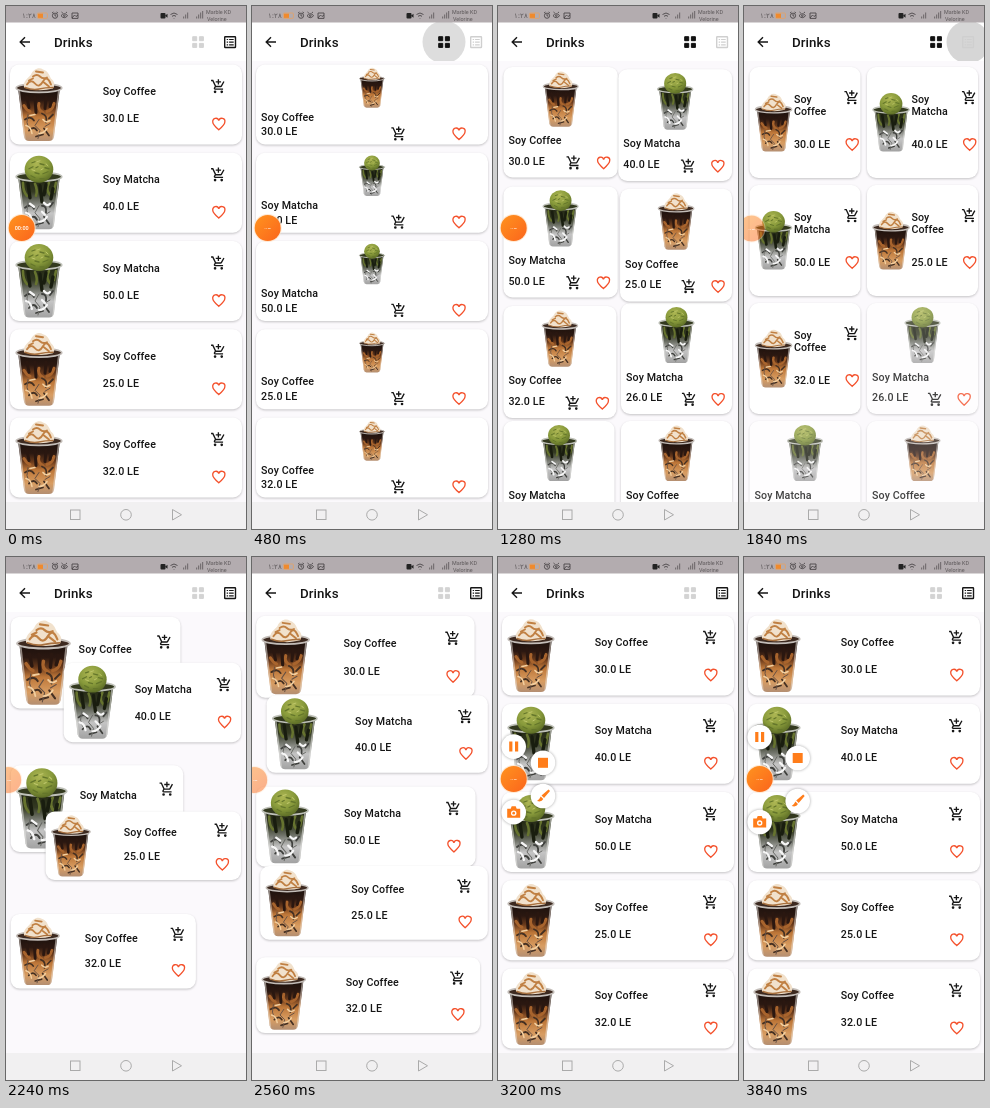
An HTML page that plays this animation: 240 px wide and 523 px high, repeating every 3920 ms.

```html
<!DOCTYPE html>
<html lang="en">
<head>
<meta charset="utf-8">
<title>Drinks</title>
<style>
  html, body { margin: 0; width: 100%; height: 100%; overflow: hidden; background: #fbf9fc; }
  svg { display: block; width: 100%; height: 100%; }
  text { font-family: Roboto, sans-serif; font-weight: 500; fill: #151515; }
  .label { font-size: 10.67px; letter-spacing: .1px; }
  .card > rect { fill: #fff; filter: drop-shadow(0 1px 1px rgba(0, 0, 0, .22)); }
  .status text { font-weight: 400; font-size: 5.4px; fill: #5c5759; }
  .bubble { fill: #fff; filter: drop-shadow(0 .5px 1.5px rgba(0, 0, 0, .35)); }
</style>
</head>
<body>
<svg viewBox="0 0 240 523" preserveAspectRatio="none">
  <defs>
    <linearGradient id="coffeeFill" x2="0" y2="1">
      <stop offset="0" stop-color="#1a100c"/><stop offset=".24" stop-color="#2b1811"/>
      <stop offset=".4" stop-color="#6b3b1c"/><stop offset=".55" stop-color="#bd7638"/>
      <stop offset=".8" stop-color="#d89d62"/><stop offset="1" stop-color="#b48f72"/>
    </linearGradient>
    <linearGradient id="matchaFill" x2="0" y2="1">
      <stop offset="0" stop-color="#1d2110"/><stop offset=".3" stop-color="#343a22"/>
      <stop offset=".48" stop-color="#6f7268"/><stop offset=".7" stop-color="#c4c4c4"/>
      <stop offset="1" stop-color="#a2a2a2"/>
    </linearGradient>
    <radialGradient id="scoop" cx=".42" cy=".3" r=".75">
      <stop offset="0" stop-color="#adb653"/><stop offset=".55" stop-color="#889a3b"/>
      <stop offset="1" stop-color="#566623"/>
    </radialGradient>
    <linearGradient id="orange" x2="1" y2="1">
      <stop offset="0" stop-color="#ff931f"/><stop offset="1" stop-color="#fb651c"/>
    </linearGradient>
    <path id="glass" d="M3 20 9 69Q10 73.5 14 73.5H34Q38 73.5 39 69L45 20Z"/>
    <clipPath id="inGlass"><use href="#glass"/></clipPath>
    <clipPath id="appBar"><rect y="16" width="240" height="39"/></clipPath>

    <g id="Coffee" fill="none" stroke-linecap="round">
      <use href="#glass" fill="url(#coffeeFill)"/>
      <g clip-path="url(#inGlass)">
        <path d="M9 38q3 5 6 6M24 36q-2 6 4 9M39 36q-2 7-7 8" stroke="#a8642d" stroke-width="3"/>
        <path d="M12 30l2 10M20 30l1 15M31 30l-1 11M37 31l-2 8" stroke="#2a1710" stroke-width="3"/>
        <path d="M10 52q6-4 9 1M27 46q6 2 4 9M14 63q5-5 8 0M29 61l5 7M21 69l7-2M34 51l4-4" stroke="#453022" stroke-width="1.8"/>
        <path d="M24 52l-4 6 5 5-2 8M13 47l-1 8 2 6M35 56l-5 3" stroke="#665043"/>
        <path d="M11 58q5 1 6 8M28 52q3 4 7 1M24 66q5 0 8-5M15 48l5-1" stroke="#f3cf9f" stroke-width="1.6"/>
        <path d="M4 21 10 73M44 21 38 73" stroke="#e5ded8" stroke-opacity=".55" stroke-width="1.6"/>
      </g>
      <ellipse cx="24" cy="20.500" rx="22.800" ry="4.300" fill="#3d2a20" stroke="#c3bdb8" stroke-width="1.700"/>
      <path d="M9 20C8 13 13 11 16 7 18 2 24-1 28 2 34 4 34 8 36 11 40 14 40 18 38 21Q24 25 9 20Z" fill="#f1e1cc"/>
      <path d="M12 17q4-6 8-1t8-2 8 3M18 9q4-3 7 0t7 1M21 4l7 1M14 13l4-2M29 15l5 4" stroke="#c08043" stroke-width="1.900"/>
      <path d="M10 20q8 3 14 1.500T38 20" stroke="#a8713f" stroke-width="1.400"/>
    </g>

    <g id="Matcha" fill="none" stroke-linecap="round">
      <use href="#glass" fill="url(#matchaFill)"/>
      <g clip-path="url(#inGlass)">
        <path d="M8 27q0 9 4 13M20 28q3 7 1 12M34 27q-4 8 2 13M41 27l-2 9" stroke="#66732f" stroke-width="2.600"/>
        <path d="M13 28l2 14M25 30l2 16M31 29l-2 10M38 33l-2 10" stroke="#191d0f" stroke-width="3.400"/>
        <path d="M10 52q6-5 9 1M27 50q5 0 4 7M14 64q5-6 8 0M29 61l5 7M21 69l7-2M35 51l3-4" stroke="#3f403d" stroke-width="1.800"/>
        <path d="M24 50l-4 7 5 6-2 8M13 46l-1 9 2 6M35 56l-5 3" stroke="#686965"/>
        <path d="M11 57q5 1 6 8M29 47q3 4 6 1M24 66q5 0 8-5M15 48l4 3M27 56l3 3" stroke="#f7f7f7" stroke-width="2.200"/>
        <path d="M4 21 10 73M44 21 38 73" stroke="#e2e2de" stroke-opacity=".6" stroke-width="1.600"/>
      </g>
      <ellipse cx="24" cy="21" rx="22.800" ry="4.300" fill="#33391f" stroke="#bfc1b9" stroke-width="1.700"/>
      <ellipse cx="24" cy="13.500" rx="14.300" ry="13.500" fill="url(#scoop)"/>
      <path d="M14 13l4-2M20 17l4 1M25 8l4 1M28 18l5-2M30 12l4 1M17 7l3-1M16 20l4 2M25 23l4 0M21 12l2-1" stroke="#64762b" stroke-width="1.300"/>
      <path d="M17 14l3 1M22 6l3-1M26 14l2-1M31 8l2 2" stroke="#bfc76b"/>
    </g>

    <path id="cart" transform="scale(.667) translate(-12 -12)" fill="#161616" d="M11 9h2V6h3V4h-3V1h-2v3H8v2h3zm-4 9a2 2 0 1 0 0 4 2 2 0 0 0 0-4zm10 0a2 2 0 1 0 0 4 2 2 0 0 0 0-4zM8.1 13h7.45c.75 0 1.41-.41 1.75-1.03l3.86-7.01L19.42 4l-3.87 7H8.53L4.27 2H1v2h2l3.6 7.59-1.35 2.44C4.52 15.37 5.48 17 7 17h12v-2H7z"/>
    <path id="heart" transform="scale(.667) translate(-12 -12)" fill="none" stroke="#f4512c" stroke-width="2" d="M12 20C5 13.8 3 11.5 3 8.5A4.6 4.6 0 0 1 12 6.3 4.6 4.6 0 0 1 21 8.5C21 11.5 19 13.8 12 20Z"/>
  </defs>

  <rect width="240" height="523" fill="#fbf9fc"/>
  <g id="cards"></g>

  <rect y="16" width="240" height="39" fill="#fff"/>
  <circle id="ripple" cy="36" fill="#000" clip-path="url(#appBar)"/>
  <path d="M24 36H14.5M19 31.2 14.2 36l4.8 4.8" fill="none" stroke="#161616" stroke-width="1.4"/>
  <text x="48" y="41" font-size="13.33" letter-spacing=".1">Drinks</text>
  <path id="gridIcon" stroke-linejoin="round" d="M186.7 30.7h4v4h-4zm6.700 0h4v4h-4zm-6.700 6.700h4v4h-4zm6.700 0h4v4h-4z"/>
  <g id="listIcon" fill="none" stroke-width="1.4">
    <rect x="218.7" y="30.7" width="10.8" height="10.8" rx=".6"/>
    <path d="M220.7 33.5h1.4m1 0h4.6m-7 2.7h1.4m1 0h4.6m-7 2.7h1.4m1 0h4.6" stroke-width="1.2"/>
  </g>

  <rect width="240" height="16.5" fill="#b3acaf"/>
  <g class="status" fill="none" stroke="#4a4648" stroke-width=".9">
    <g stroke="none">
      <text x="16" y="12" style="font: 7px 'DejaVu Sans', sans-serif">١:٢٨</text>
      <text x="200" y="8">Marble KD</text>
      <text x="201" y="14.6">Velorine</text>
      <rect x="32" y="7.5" width="5" height="4.4" fill="#f08a2c"/>
      <rect x="154.500" y="7" width="5" height="5.400" rx="1" fill="#222"/>
      <path d="M159 9.700l2.500-2v4z" fill="#222"/>
      <path d="M177 12.400v-2h1.200v2zm2 0v-4h1.200v4zm2 0v-6h1.200v6zM190 12.400v-2h1.200v2zm2 0v-4h1.200v4zm2 0v-6h1.200v6zm2 0v-7.500h1.200v7.500z" fill="#767073"/>
    </g>
    <rect x="31.400" y="7" width="10" height="5.400" rx="1" stroke="#e0a36c"/>
    <circle cx="49" cy="9.700" r="2.600"/><path d="M49 8v2h1.300M46 7l1.500-1M52 7l-1.500-1"/>
    <path d="M55 9.700q3.300-4 6.600 0-3.300 4-6.600 0M55.500 6l1.300 1M61 6l-1.300 1"/><circle cx="58.300" cy="9.700" r=".8"/>
    <path d="M66 7h6v5.400h-6zM66 12l2.500-3 1.500 1.500 2-1.500"/>
    <path d="M164.500 8.500q3.500-3 7 0M166 10.300q2-1.700 4 0M168 12v.5"/>
  </g>

  <rect y="496" width="240" height="27" fill="#f1f0f1"/>
  <g fill="none" stroke="#aaa">
    <rect x="64.500" y="504" width="9.500" height="9.500"/>
    <circle cx="120" cy="508.800" r="5.300"/>
    <path d="M166.500 503.500v10.500l9-5.250z"/>
  </g>

  <g id="recorder">
    <g id="menu" fill="#ff7d1a">
      <g><circle class="bubble" r="12.300"/><path d="M-4.500-5h3.200V5h-3.200zM1.300-5h3.200V5H1.300z"/></g>
      <g><circle class="bubble" r="12.300"/><path d="M-5-5H5V5H-5z"/></g>
      <g><circle class="bubble" r="12.300"/><path d="M5.500-6.500 7-5 1 2-1.500-.5zM-2.300.5.300 3Q-1.500 6.500-6 5q2.200-1 3.700-4.500z"/></g>
      <g><circle class="bubble" r="12.300"/><path d="M-6.500-3.500h3.500l1-2.500h4l1 2.500h3.500v9h-13z"/><circle cy="1" r="2.700" fill="#fff"/><circle cy="1" r="1.300"/></g>
    </g>
    <circle r="14" fill="#ffe3c8" fill-opacity=".8"/>
    <circle r="13" fill="url(#orange)"/>
    <text id="timer" y="2" text-anchor="middle" style="font-size: 5.500px; fill: #fff">00:00</text>
  </g>
</svg>

<script>
const LOOP = 3920, STEP = 80, MOVE_MS = 1000;
const TO_GRID = { layout: 400, move: 483, icons: 480 };
const TO_LIST = { layout: 1840, move: 1935, icons: 1920 };

// Flavour, price, and how far width and height run ahead of the position.
const items = [
  ["Coffee", "30.0", -.15, .4], ["Matcha", "40.0", .1, 2],
  ["Matcha", "50.0", -.06, 1.05], ["Coffee", "25.0", .7, 3.4],
  ["Coffee", "32.0", .36, 2.6], ["Matcha", "26.0"],
  ["Matcha", "28.0"], ["Coffee", "35.0"],
];
const LISTED = 5;
const paintOrder = [5, 6, 7, 0, 2, 1, 3, 4];

const $ = id => document.getElementById(id);
const clamp = v => Math.min(1, Math.max(0, v));
const ramp = (t, from, to) => clamp((t - from) / (to - from));
const mix = (a, b, p) => a + (b - a) * p;
const place = (node, x, y, s = 1) => node.setAttribute("transform", `translate(${x} ${y}) scale(${s})`);

function set(node, attrs) {
  for (const name in attrs) node.setAttribute(name, attrs[name]);
  return node;
}
function add(parent, tag, attrs) {
  const node = document.createElementNS("http://www.w3.org/2000/svg", tag);
  parent.append(set(node, attrs));
  return node;
}

// cubic-bezier(.25, .1, .25, 1)
function ease(x) {
  if (x <= 0 || x >= 1) return clamp(x);
  const curve = (a, b, s) => 3 * (1 - s) ** 2 * s * a + 3 * (1 - s) * s * s * b + s ** 3;
  let low = 0, high = 1;
  for (let i = 0; i < 24; i++) {
    const mid = (low + high) / 2;
    if (curve(.25, .25, mid) < x) low = mid; else high = mid;
  }
  return curve(.1, 1, low);
}

const cards = paintOrder.map(index => {
  const [flavour, price, leadW, leadH] = items[index];
  const root = add($("cards"), "g", { class: "card" });
  const box = add(root, "rect", { rx: 9 });
  const cup = add(root, "use", { href: "#" + flavour });
  const title = add(root, "text", { class: "label" });
  const second = add(root, "text", { class: "label" });
  const cost = add(root, "text", { class: "label" });
  cost.textContent = price + " LE";
  const cart = add(root, "use", { href: "#cart" });
  const heart = add(root, "use", { href: "#heart" });
  return { index, flavour, leadW, leadH, root, box, cup, title, second, cost, cart, heart };
});

function putCup(card, centerX, top, height) {
  const scale = height / 74;
  place(card.cup, centerX - 24 * scale, top, scale);
}

function layoutGrid(card, w, h) {
  putCup(card, w / 2, h * .035, h * .51);
  card.title.textContent = "Soy " + card.flavour;
  card.second.textContent = "";
  set(card.title, { x: 5, y: h * .7 });
  set(card.cost, { x: 5, y: h * .885 });
  place(card.cart, w * .615, h * .868);
  place(card.heart, w * .875, h * .872);
}

function layoutList(card, w, h) {
  const cupHeight = Math.min(h - 6, w * .53);
  const grow = h - 80, textX = w * .4, baseline = 30.5 + grow / 2;
  const iconX = w - 9 - (w - 110) * .123;
  const wraps = w < 130;
  putCup(card, 5 + cupHeight * .324, (h - cupHeight) / 2, cupHeight);
  card.title.textContent = wraps ? "Soy" : "Soy " + card.flavour;
  card.second.textContent = wraps ? card.flavour : "";
  set(card.title, { x: textX, y: wraps ? baseline - 10.5 : baseline });
  set(card.second, { x: textX, y: baseline + 1.5 });
  set(card.cost, { x: textX, y: 57.5 + grow * .75 });
  place(card.cart, iconX + .4, 22 + grow * .28);
  place(card.heart, iconX + .8, 60 + grow * .58);
}

function drawCard(card, t) {
  const { index } = card, right = index % 2, row = index >> 1;
  const returning = t >= TO_LIST.layout;
  const gridY = 61 + 118 * row;
  let x = 5.5 + 117.5 * right, y = gridY, w = 111, h = 111;
  if (index < LISTED) {
    const q = ease((t - (returning ? TO_LIST : TO_GRID).move) / MOVE_MS);
    const toward = lead => {
      const p = q + lead * q * (1 - q);
      return returning ? 1 - p : p;
    };
    const p = toward(0);
    w = mix(232, 111, toward(card.leadW));
    h = mix(80, 111, toward(card.leadH));
    x = right ? mix(236, 234, p) - w : mix(4, 5.5, p);
    y = mix(58.5 + 88.25 * index, gridY, p);
  } else {
    set(card.root, { opacity: ramp(t, 480, 720) - ramp(t, 1760, 2160) });
  }
  place(card.root, x, y);
  set(card.box, { width: w, height: h });
  const asGrid = index >= LISTED || (t >= TO_GRID.layout && !returning);
  (asGrid ? layoutGrid : layoutList)(card, w, h);
}

function drawAppBar(t) {
  const gridOn = t >= TO_GRID.icons && t < TO_LIST.icons;
  const gridColor = gridOn ? "#111" : "#d3d3d3";
  set($("gridIcon"), { fill: gridColor, stroke: gridColor });
  set($("listIcon"), { stroke: gridOn ? "#cfcfcf" : "#161616" });
  const second = t >= 1600, start = second ? 1680 : 240;
  set($("ripple"), {
    cx: second ? 224 : 192,
    r: mix(8, 21.5, ramp(t, start, start + 160)),
    opacity: .16 * (ramp(t, start - 40, start + 120) - ramp(t, start + 200, start + 440)),
  });
}

const menuOffsets = [[0, -42], [38, -21], [38, 22], [0, 43]];
function drawRecorder(t) {
  const docked = ramp(t, 1600, 2000) - ramp(t, 2960, 3060);
  place($("recorder"), 15.7 - 13.5 * docked, 222 + docked);
  set($("recorder"), { opacity: 1 - .5 * clamp(docked * 2) });
  const open = 1 - (1 - ramp(t, 3080, 3310)) ** 2;
  set($("menu"), { visibility: open ? "visible" : "hidden" });
  menuOffsets.forEach(([x, y], i) => place($("menu").children[i], x * open, y * open));
  $("timer").textContent = t < STEP ? "00:00" : "··–";
}

function frame(now) {
  const t = Math.floor((now + 4) / STEP) * STEP % LOOP;
  cards.forEach(card => drawCard(card, t));
  drawAppBar(t);
  drawRecorder(t);
  requestAnimationFrame(frame);
}
frame(0);
</script>
</body>
</html>
```
